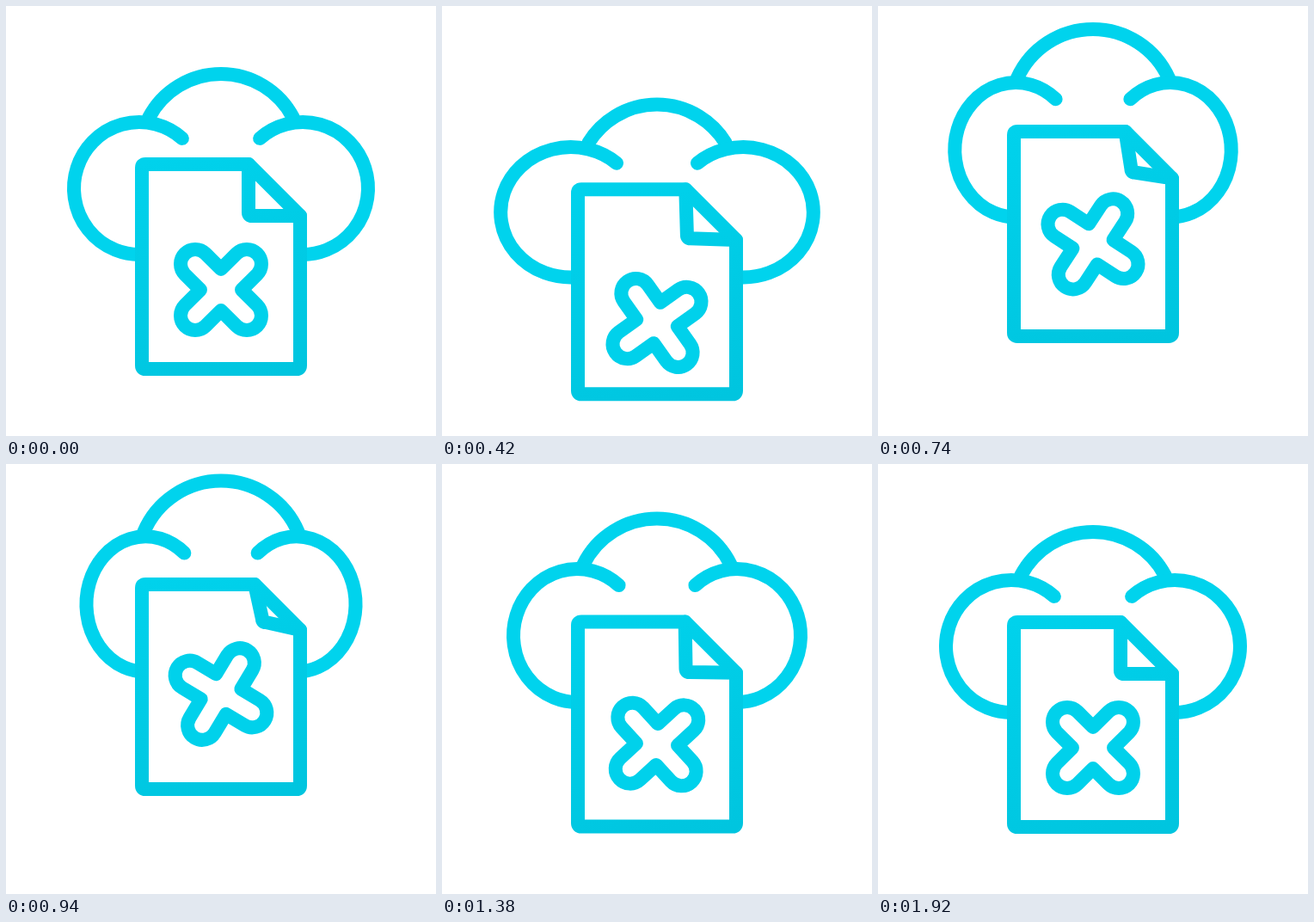
Recreate the animation shown at these times as an HTML page. Size 500x500 px, loop 2.24 s.

```html
<!DOCTYPE html>
<html lang="en">
<head>
<meta charset="utf-8">
<title>Bouncing cloud file</title>
<style>
  html, body { margin: 0; width: 100%; height: 100%; overflow: hidden; background: #fff; }
  svg { display: block; width: 100vw; height: 100vh; }
  path { fill: none; stroke-width: 16; stroke-linecap: round; stroke-linejoin: round; }
</style>
</head>
<body>
<svg viewBox="0 0 500 500">
  <defs>
    <linearGradient id="page" gradientUnits="userSpaceOnUse" x1="190" y1="170" x2="290" y2="440">
      <stop offset="0" stop-color="#00d2ec"/>
      <stop offset="1" stop-color="#00c5df"/>
    </linearGradient>
  </defs>
  <g id="cloud" stroke="#00d3ed">
    <path id="crown"/>
    <path id="left"/>
    <path id="right"/>
  </g>
  <g id="doc" stroke="url(#page)">
    <path id="sheet" style="fill:#fff"/>
    <path id="fold"/>
  </g>
  <path id="cross" stroke="#00d1eb"
    d="M-17-17V-42.4A17 17 0 0 1 17-42.4V-17H42.4A17 17 0 0 1 42.4 17H17V42.4A17 17 0 0 1-17 42.4V17H-42.4A17 17 0 0 1-42.4-17Z"/>
</svg>
<script>
const LOOP = 2240, STEP = 20;

// Each track is a list of [time, value]
const tracks = {
  cloudY: [[160, 0], [260, 14], [380, 36], [560, -28], [700, -44], [930, -51],
           [1140, 3], [1245, 35], [1380, -13], [1540, -27], [1790, 0]],
  squeeze: [[160, 0], [260, -2], [385, -12], [560, 2], [930, 14.5],
            [1140, 6], [1250, -12], [1380, 4], [1540, 5], [1790, 0]],
  docY: [[165, 0], [260, 8], [400, 31], [560, -19], [700, -36], [940, -44],
         [1140, -8], [1252, 30], [1380, -0.5], [1545, -17], [1790, 0]],
  crossY: [[165, 0], [260, 11], [395, 42], [560, -27], [700, -50], [940, -62.5],
           [1140, -12], [1252, 40], [1380, -4], [1545, -25], [1790, 0]],
  spin: [[260, 0], [560, 28], [940, 166], [1140, 294], [1380, 362.5],
         [1580, 370], [1800, 366], [1920, 360]],
  curl: [[260, 0], [560, 7], [930, 16], [1140, 10], [1380, 1.5], [1600, 0]]
};

// Smooth curve through the keys, flat at every turning point
function sample(keys, t) {
  const last = keys.length - 1;
  if (t <= keys[0][0]) return keys[0][1];
  if (t >= keys[last][0]) return keys[last][1];
  const rate = i => (keys[i + 1][1] - keys[i][1]) / (keys[i + 1][0] - keys[i][0]);
  const slope = i => {
    if (i === 0 || i === last) return 0;
    const a = rate(i - 1), b = rate(i);
    return a * b <= 0 ? 0 : 2 * a * b / (a + b);
  };
  const i = keys.findIndex(k => k[0] > t) - 1;
  const [t0, v0] = keys[i], [t1, v1] = keys[i + 1];
  const h = t1 - t0, u = (t - t0) / h, w = 1 - u;
  return w * w * (1 + 2 * u) * v0 + u * u * (1 + 2 * w) * v1
       + h * u * w * (w * slope(i) - u * slope(i + 1));
}

const el = id => document.getElementById(id);
const set = (id, name, value) => el(id).setAttribute(name, value);

function puff(s, side) {
  const rx = 76 - s / 2, ry = 77 + s * 0.12;
  const cx = -95 + s / 2, cy = 212 + s * 0.12;
  const at = deg => {
    const a = deg * Math.PI / 180;
    return `${250 + side * (cx + rx * Math.cos(a))} ${cy + ry * Math.sin(a)}`;
  };
  return `M${at(-49)}A${rx} ${ry} 0 1 ${side > 0 ? 0 : 1} ${at(85)}`;
}

function crown(s) {
  const half = 84 + s * 0.4, rise = 51 + s * 0.6;
  const r = (half * half + rise * rise) / (2 * rise);
  return `M${250 - half} 130A${r} ${r} 0 0 1 ${250 + half} 130`;
}

function draw(t) {
  const p = {};
  for (const name in tracks) p[name] = sample(tracks[name], t);

  set('cloud', 'transform', `translate(0 ${p.cloudY})`);
  set('crown', 'd', crown(p.squeeze));
  set('left', 'd', puff(p.squeeze, 1));
  set('right', 'd', puff(p.squeeze, -1));

  const k = p.curl, x = 282 + k * 0.45, y = 244 - k * 0.45;
  set('doc', 'transform', `translate(0 ${p.docY})`);
  set('sheet', 'd', `M162 184H${x}L342 ${y}V418Q342 422 338 422H162Q158 422 158 418V188Q158 184 162 184Z`);
  set('fold', 'd', `M${x} 184L${282 + k} ${240 - k}Q${282 + k} ${244 - k} ${286 + k} ${244 - k}L342 ${y}`);

  set('cross', 'transform', `translate(250 ${330 + p.crossY}) rotate(${45 + p.spin})`);
}

const start = performance.now();
function tick() {
  const t = (performance.now() - start) % LOOP;
  draw(Math.floor(t / STEP) * STEP);
  requestAnimationFrame(tick);
}
tick();
</script>
</body>
</html>
```
